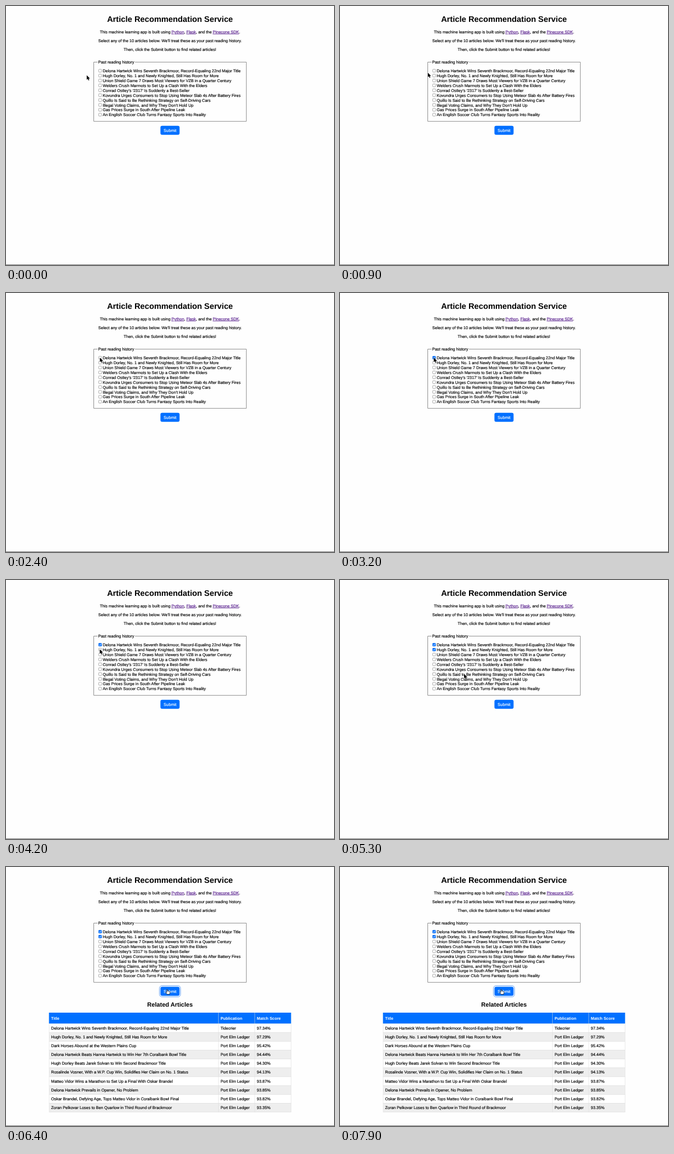
Write an HTML page that moves like this. It is 600x473 px and loops after 8000 ms.

```html
<!DOCTYPE html>
<html lang="en">
<head>
<meta charset="utf-8">
<title>Article Recommendation Service</title>
<style>
html, body { margin: 0; width: 100%; height: 100%; overflow: hidden; background: #fefefe; }
svg { display: block; width: 600px; height: 473px; }
text {
  font: 7.38px "Liberation Sans", Arial, Helvetica, sans-serif;
  text-rendering: geometricPrecision;
  color: #000; fill: currentColor; stroke: currentColor; stroke-width: 0.16px;
}
.mid { text-anchor: middle; }
.bold { font-weight: bold; stroke: none; }
.white { color: #fff; }
.link { color: #551a8b; fill: currentColor; stroke: currentColor; text-decoration: underline; }
</style>
</head>
<body>
<svg id="stage" viewBox="0 0 600 473"></svg>
<script>
const BLUE = '#0070ff', LOOP = 8000;

const articles = [
  'Delona Hartwick Wins Seventh Brackmoor, Record-Equaling 22nd Major Title',
  'Hugh Dorley, No. 1 and Newly Knighted, Still Has Room for More',
  'Union Shield Game 7 Draws Most Viewers for VZB in a Quarter Century',
  'Welders Crush Marmots to Set Up a Clash With the Elders',
  'Conrad Ostley’s ‘2317’ Is Suddenly a Best-Seller',
  'Kovundra Urges Consumers to Stop Using Meteor Slab 4s After Battery Fires',
  'Quillo Is Said to Be Rethinking Strategy on Self-Driving Cars',
  'Illegal Voting Claims, and Why They Don’t Hold Up',
  'Gas Prices Surge in South After Pipeline Leak',
  'An English Soccer Club Turns Fantasy Sports Into Reality'
];

const results = [
  [articles[0], '97.34%'],
  [articles[1], '97.29%'],
  ['Dark Horses Abound at the Western Plains Cup', '95.42%'],
  ['Delona Hartwick Beats Hanna Hartwick to Win Her 7th Coralbank Bowl Title', '94.44%'],
  ['Hugh Dorley Beats Jarek Solvan to Win Second Brackmoor Title', '94.30%'],
  ['Rosalinde Vosner, With a W.P. Cup Win, Solidifies Her Claim on No. 1 Status', '94.13%'],
  ['Matteo Vidor Wins a Marathon to Set Up a Final With Oskar Brandel', '93.87%'],
  ['Delona Hartwick Prevails in Opener, No Problem', '93.85%'],
  ['Oskar Brandel, Defying Age, Tops Matteo Vidor in Coralbank Bowl Final', '93.82%'],
  ['Zoran Pelkovar Loses to Ben Quarlow in Third Round of Brackmoor', '93.35%']
];

const text = (x, y, s, cls = '', size = 7.38) =>
  `<text x="${x}" y="${y}" class="${cls}" style="font-size:${size}px">${s}</text>`;
const rect = (x, y, w, h, attrs) =>
  `<rect x="${x}" y="${y}" width="${w}" height="${h}" ${attrs}/>`;
const link = s => `<tspan class="link">${s}</tspan>`;

function option(title, i) {
  const y = 121.1 + i * 8.92;
  return rect(169.6, y - 5.5, 5.2, 5.2, 'rx="0.9" fill="#fff" stroke="#767676" stroke-width="0.6"') +
    `<g id="check${i}">` + rect(169.3, y - 5.8, 5.8, 5.8, `rx="1" fill="${BLUE}"`) +
    `<path d="M170.6 ${y - 2.8}l1.3 1.4 2-3.2" fill="none" stroke="#fff" stroke-width="0.9"/></g>` +
    text(177, y, title);
}

function tableRow([title, score], i) {
  const top = 286 + i * 16.17, y = top + 10.6;
  return rect(79, top, 442.3, 16.17, `fill="${i % 2 ? '#eee' : '#fff'}" stroke="#ddd" stroke-width="0.6"`) +
    text(82.6, y, title) +
    text(392.4, y, i ? 'Port Elm Ledger' : 'Tidecrier') +
    text(458.8, y, score);
}

const page =
  text(300, 29.4, 'Article Recommendation Service', 'mid bold', 14.74) +
  text(300, 49.7, `This machine learning app is built using ${link('Python')}, ${link('Flask')}, and the ${link('Pinecone SDK')}.`, 'mid') +
  text(300, 65.7, 'Select any of the 10 articles below. We\'ll treat these as your past reading history.', 'mid') +
  text(300, 81.7, 'Then, click the Submit button to find related articles!', 'mid') +
  '<path d="M167.5 102.5H160.5V210.7H439.7V102.5H236" fill="none" stroke="#808080" stroke-width="0.9"/>' +
  text(168.7, 105, 'Past reading history', '', 7.44) +
  articles.map(option).join('') +
  rect(280.7, 216.9, 38.6, 20.2, 'id="ring" rx="4.5" fill="#fff" stroke="#5b9df5" stroke-width="1"') +
  rect(282.5, 218.8, 35, 16.4, `rx="3.3" fill="${BLUE}"`) +
  text(300, 229.6, 'Submit', 'mid white', 7.6) +
  rect(0, 472, 600, 1, 'fill="#777"');

const table = '<g id="results">' +
  text(300, 254.7, 'Related Articles', 'mid bold', 11.08) +
  results.map(tableRow).join('') +
  rect(78.6, 266, 442.9, 19.8, `fill="${BLUE}"`) +
  text(82.6, 278.7, 'Title', 'bold white') +
  text(392.4, 278.7, 'Publication', 'bold white') +
  text(458.8, 278.7, 'Match Score', 'bold white') +
  '<path d="M388.6 266V447.7M455 266V447.7" stroke="#ddd" stroke-width="0.6"/></g>';

const pointers =
  '<path id="arrow" d="M0 0V8.2L1.9 6.5 3.2 9.4 4.6 8.8 3.4 6H5.9Z" stroke="#fff" stroke-width="0.7" paint-order="stroke"/>' +
  '<path id="hand" d="M-.8 .6Q0-.5 .8 .6V3.1L2.2 3.3 3.6 3.6 4.9 4.2V6.4L4.2 9H-.3L-3 5.6Q-3 4.5-1.9 4.9L-.8 5.8Z" fill="#fff" stroke="#000" stroke-width="0.7"/>';

const $ = id => document.getElementById(id);
$('stage').innerHTML = page + table + pointers;
const show = (id, on) => $(id).setAttribute('visibility', on ? 'visible' : 'hidden');

// Pointer stops: time, x, y
const path = [
  [0, 147.7, 126.5], [400, 147.7, 126.5], [1400, 173.6, 117], [2000, 173.6, 117],
  [2500, 171.6, 118], [3500, 171.6, 118], [3900, 171.6, 126.5], [4600, 171.6, 126.5],
  [5300, 227, 171.5], [5900, 295, 223.5], [LOOP, 295, 223.5]
];

function pointerAt(t) {
  const i = path.findIndex(p => p[0] > t);
  const [t0, x0, y0] = path[i - 1], [t1, x1, y1] = path[i];
  const u = (t - t0) / (t1 - t0), k = u * u * (3 - 2 * u);
  return [x0 + (x1 - x0) * k, y0 + (y1 - y0) * k];
}

function draw(now) {
  const t = Math.floor(now % LOOP / 100) * 100;
  const place = `translate(${pointerAt(t)})`;
  const onButton = t >= 5900;
  for (const id of ['arrow', 'hand']) $(id).setAttribute('transform', place);
  show('arrow', !onButton);
  show('hand', onButton);
  articles.forEach((_, i) => show('check' + i, i === 0 && t >= 3000 || i === 1 && t >= 4300));
  show('ring', t >= 6200);
  show('results', t >= 6400);
  requestAnimationFrame(draw);
}
draw(0);
</script>
</body>
</html>
```
